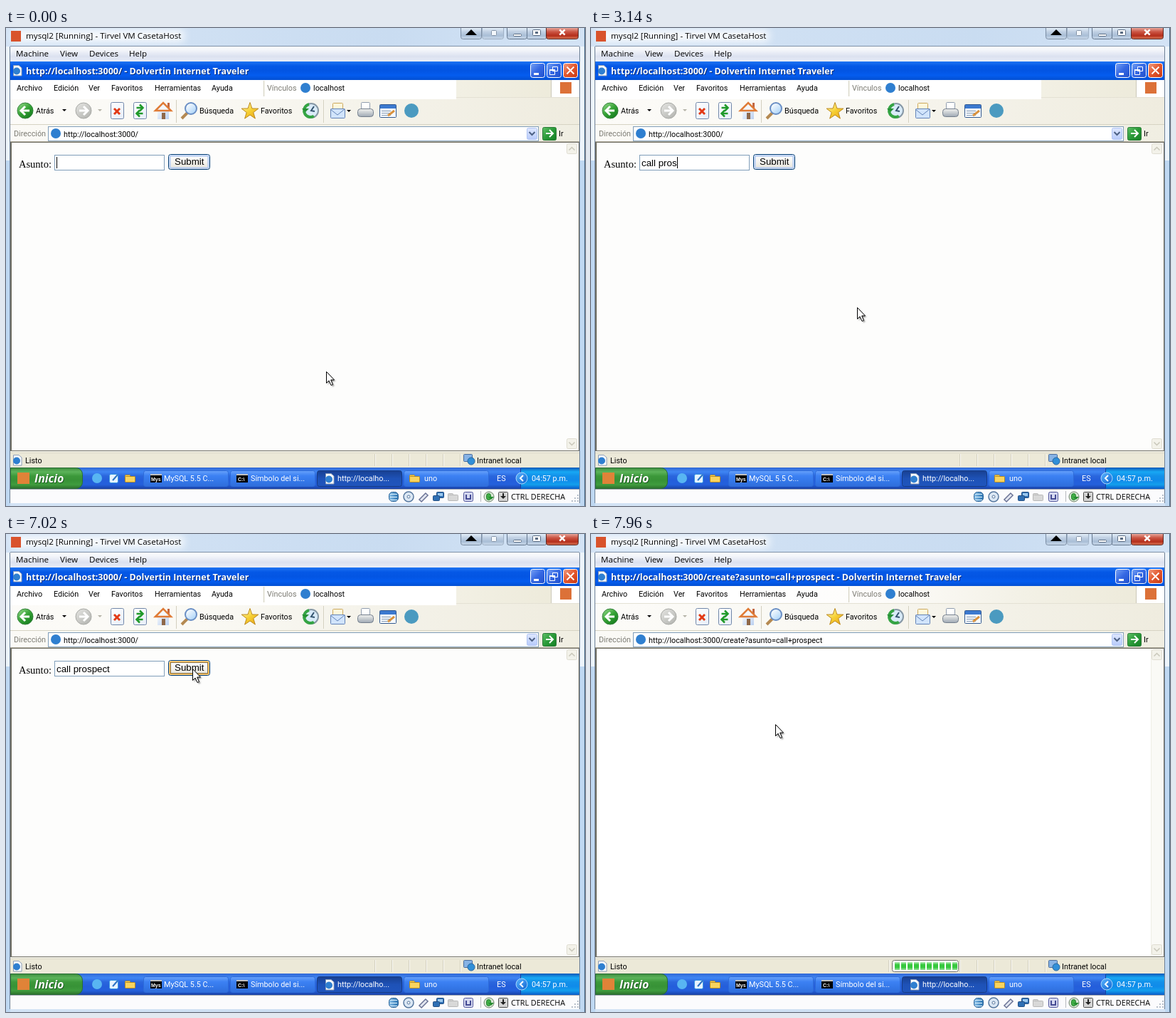
These frames come from a looping animation (814 by 671 pixels, 8 s). An HTML page with a canvas:

```html
<!DOCTYPE html>
<html lang="es">
<head>
<meta charset="utf-8">
<title>Formulario</title>
<style>
html, body { margin: 0; width: 814px; height: 671px; overflow: hidden; background: #fff; }
canvas { display: block; }
</style>
</head>
<body>
<canvas id="stage" width="814" height="671"></canvas>
<script>
const ctx = document.getElementById('stage').getContext('2d');
const UI = '10.8px Roboto, sans-serif';
const HOST = '11.6px "Open Sans", sans-serif';
const CAPTION = 'bold 12.5px "Open Sans", sans-serif';
const FORM = '13.33px "Liberation Sans", sans-serif';
const SERIF = '14.5px "Liberation Serif", serif';
const CREAM = '#ece9d8';
const GLOBE = '#2f7fd0';
const URL_HOME = 'http://localhost:3000/';
const URL_DONE = URL_HOME + 'create?asunto=call+prospect';

const LOOP = 8000;
const TICK = 134.7;
const TYPE_START = 1670, TYPE_END = 4620, KEY_TIME = 183;
const TAB = 5040, HOVER = 6890, LOAD = 7290, DONE = 7680;

const clamp = (v, lo, hi) => Math.min(hi, Math.max(lo, v));
const smooth = (t, start, end) => {
  const u = clamp((t - start) / (end - start), 0, 1);
  return u * u * (3 - 2 * u);
};
const mix = (a, b, u) => a + (b - a) * u;

// The pointer is sampled once per tick: glide in, swing round to the button, drop away
function pointerAt(t) {
  const time = Math.floor(t / TICK) * TICK;
  const glide = smooth(time, 0, 220), swing = smooth(time, 6200, 7000), drop = smooth(time, 7200, 7945);
  const follow = (from, rest, pull, button, end) => {
    const start = mix(from, rest, glide);
    const curve = mix(mix(start, pull, swing), mix(pull, button, swing), swing);
    return mix(curve, end, drop);
  };
  return [follow(450, 374, 60, 262, 259), follow(482, 392, 235, 189, 267)].map(Math.round);
}
const typedAt = t => clamp(1 + Math.floor((t - TYPE_START) / KEY_TIME), 0, 13);
const caretAt = t => t < TYPE_START ? Math.floor((t + 435) / 565) % 2 === 0 : t < TYPE_END;
const blocksAt = t => clamp(1 + Math.floor((t - 7400) / 30), 0, 10);
const networkAt = t => Math.floor(t / TICK) % 7 === 0 && (t > 6300 || t > TYPE_START && t < TYPE_END);

function ramp(x0, y0, x1, y1, ...colors) {
  const g = ctx.createLinearGradient(x0, y0, x1, y1);
  colors.forEach((c, i) => g.addColorStop(i / (colors.length - 1), c));
  return g;
}
const down = (y, h, ...colors) => ramp(0, y, 0, y + h, ...colors);
const across = (...colors) => ramp(6, 0, 806, 0, ...colors);

function paint(fill, stroke, width = 1) {
  if (fill) { ctx.fillStyle = fill; ctx.fill(); }
  if (stroke) { ctx.strokeStyle = stroke; ctx.lineWidth = width; ctx.stroke(); }
}
function rect(x, y, w, h, fill) {
  ctx.fillStyle = fill;
  ctx.fillRect(x, y, w, h);
}
function round(x, y, w, h, r, fill, stroke, width) {
  ctx.beginPath();
  ctx.roundRect(x + .5, y + .5, w - 1, h - 1, r);
  paint(fill, stroke, width);
}
function disc(x, y, r, fill, stroke, width) {
  ctx.beginPath();
  ctx.arc(x, y, r, 0, Math.PI * 2);
  paint(fill, stroke, width);
}
function shape(x, y, points, fill, stroke, width, open) {
  ctx.beginPath();
  for (let i = 0; i < points.length; i += 2) ctx.lineTo(x + points[i], y + points[i + 1]);
  if (!open) ctx.closePath();
  paint(fill, stroke, width);
}
const line = (x, y, points, color, width) => shape(x, y, points, null, color, width, true);
function text(str, x, y, font = UI, color = '#000') {
  ctx.font = font;
  ctx.fillStyle = color;
  ctx.fillText(str, x, y);
}
function cross(x, y, r, color, width) {
  line(x, y, [-r, -r, r, r], color, width);
  line(x, y, [r, -r, -r, r], color, width);
}
function sideArrow(x, y, dir, r, color, width) {
  line(x, y, [-r * dir, 0, r * dir, 0], color, width);
  line(x, y, [0, -r, r * dir, 0, 0, r], color, width);
}
const chevronV = (x, y, r, dir, color, width) => line(x, y, [-r, -dir * r / 2, 0, dir * r / 2, r, -dir * r / 2], color, width);
const dropMark = (x, y, color, r = 3) => shape(x, y, [-r, 0, r, 0, 0, r], color);
function groove(x, y, h) {
  rect(x, y, 1, h, '#d3d0c0');
  rect(x + 1, y, 1, h, '#f9f8f2');
}
function pageIcon(x, y) {
  shape(x, y, [2.5, .5, 10, .5, 14, 4, 14, 15, 2.5, 15], '#fff', '#8a9bb5');
  disc(x + 7, y + 8.5, 5, GLOBE);
}
function folder(x, y, color = '#f9d45f', edge = '#b58a20') {
  round(x, y + 2, 8, 5, 1, color, edge);
  round(x, y + 4, 15, 9, 1, color, edge);
}

function hostWindow() {
  rect(0, 0, 814, 671, across('#d3e3f5', '#cfe0f3', '#c9dcf1', '#d3e3f5'));
  ctx.save();
  ctx.filter = 'blur(6px)';
  rect(10, 3, 240, 16, 'rgba(255,255,255,.9)');
  ctx.restore();
  for (const x of [0, 807]) {
    rect(x, 26, 6, 160, '#edf4fb');
    rect(x, 186, 6, 485, '#bfd8f2');
  }
  rect(5, 26, 1, 641, '#6f8196');
  rect(806, 26, 1, 641, '#6f8196');
  rect(813, 0, 1, 671, '#4b6d8c');

  rect(7, 4, 14, 15, '#d9532c');
  text('mysql2 [Running] - Tirvel VM CasetaHost', 28, 15, HOST);

  const glass = down(0, 16, '#e2edf8', '#c0d0e3', '#a9bed6', '#d0deee');
  round(639, -5, 30, 21, 3, glass, '#7b8da3');
  round(669, -5, 31, 21, 3, glass, '#9fb0c4');
  shape(654, 2, [0, 0, 8, 8, -8, 8], '#000');
  round(682, 3, 8, 8, 1, '#f4f8fc', '#8494a8');
  round(704, -5, 29, 21, 3, glass, '#65788f');
  round(732, -5, 28, 21, 2, glass, '#65788f');
  round(759, -5, 46, 21, 3, down(0, 16, '#e6a397', '#cb5544', '#b52e1b', '#dc7e5b'), '#5d2a25');
  round(713, 8, 12, 4, 1, '#fff', '#596b82');
  round(740, 2, 12, 9, 1, '#fff', '#596b82');
  rect(744, 5, 4, 3, '#596b82');
  cross(782, 6, 3.7, '#fff', 2.5);

  rect(6, 25, 800, 1, '#7d8fa6');
  rect(6, 26, 800, 21, down(26, 21, '#ffffff', '#eef1f8', '#dbe1f0', '#e9edf7'));
  text('Machine', 14, 40, HOST);
  text('View', 76, 40, HOST);
  text('Devices', 117, 40, HOST);
  text('Help', 173, 40, HOST);
}

function captionButton(x, ...colors) {
  round(x, 49, 21, 21, 3, ramp(x, 49, x + 20, 70, ...colors), '#fff');
}

function caption(url) {
  rect(6, 47, 800, 26, down(47, 26, '#1f74f2', '#0558e6', '#0355e3', '#045cef', '#0450d2'));
  pageIcon(8, 52);
  const title = url + ' - Dolvertin Internet Traveler';
  text(title, 29, 66, CAPTION, '#06307f');
  text(title, 28, 65, CAPTION, '#fff');
  const blue = ['#7ba5f5', '#3568e3', '#2050cc'];
  captionButton(737, ...blue);
  captionButton(760, ...blue);
  captionButton(783, '#f0a58c', '#e3572d', '#c53612');
  rect(742, 63, 7, 3, '#fff');
  round(768, 54, 8, 7, 0, null, '#fff');
  round(764, 58, 8, 8, 0, null, '#fff');
  rect(764, 58, 8, 2, '#fff');
  cross(793.5, 59.5, 5, '#fff', 2);
}

function toolbarIcons() {
  disc(27, 116, 11, ramp(18, 106, 34, 126, '#8fd685', '#36a336', '#167d1f'), '#34813a');
  sideArrow(27, 116, -1, 6, '#fff', 3);
  disc(109, 116, 11, ramp(100, 106, 116, 126, '#e2e2df', '#b6b7b3'), '#a8a9a5');
  sideArrow(109, 116, 1, 6, '#fff', 3);
  dropMark(82, 114, '#000');
  dropMark(132, 114, '#b5b3a8');

  for (const x of [147, 179]) round(x, 104, 19, 24, 2, ramp(x, 104, x + 18, 127, '#fff', '#e7eef9'), '#7187a9');
  cross(156, 117, 4, '#e23a16', 3);
  sideArrow(188, 112, 1, 4.5, '#209a2a', 2.5);
  sideArrow(188, 120, -1, 4.5, '#209a2a', 2.5);

  rect(213, 115, 16, 13, ramp(212, 110, 230, 128, '#fff', '#b9cff0'));
  rect(227, 105, 3, 8, '#c26842');
  shape(210, 116, [0, 0, 11, -11, 22, 0], '#f4f7fc', '#e07c37', 2.5);
  rect(219, 119, 5, 9, '#8e684a');
  groove(239, 101, 32);

  line(255, 119, [0, 0, -8, 8], '#b58a52', 4);
  disc(260, 113, 8, ramp(254, 106, 266, 120, '#ffffff', '#a9d3f8'), '#6a8fc5', 2);
  const star = [];
  for (let i = 0; i < 10; i++) {
    const r = i % 2 ? 5 : 12.5, a = i * Math.PI / 5 - Math.PI / 2;
    star.push(r * Math.cos(a), r * Math.sin(a));
  }
  shape(343, 117, star, ramp(335, 106, 350, 128, '#fff8a0', '#f6cf32', '#e9a51a'), '#bd8a1d');
  disc(429, 116, 10, '#d9ebf8', '#8798a6', 2);
  line(429, 116, [4, -6, 0, 0, 5, 1], '#33536e', 2);
  ctx.beginPath();
  ctx.arc(428, 116, 9, 1, 4.5);
  paint(null, '#35a444', 4);
  dropMark(421, 113, '#279135', 5);
  groove(446, 101, 32);

  round(459, 105, 15, 14, 1, '#fff8dc', '#cba85e');
  round(456, 113, 21, 14, 1, '#d1e4fb', '#6283b7');
  line(456, 114, [0, 0, 10, 8, 20, 0], '#6283b7');
  dropMark(482, 115, '#000');
  round(499, 104, 13, 12, 1, '#fff', '#909dae');
  round(494, 113, 23, 12, 4, down(113, 12, '#f5f5f1', '#9ba5b1'), '#747f8c');
  round(525, 107, 24, 19, 1, '#f7fbff', '#31588f');
  rect(526, 108, 22, 5, '#3c79cf');
  for (let y = 116; y < 124; y += 3) rect(528, y, 13, 1, '#8196b0');
  line(537, 123, [0, 0, 9, -7], '#d9923e', 3);
  disc(570, 116, 10, '#4b9ac0');
}

function browserBars(url, repainted) {
  rect(6, 73, 800, 87, CREAM);
  rect(6, 73, 800, 25, across('#fff', '#fff', '#fdfcfa', '#f3f1e6', CREAM));
  rect(6, 98, 800, 38, across('#fcfbf8', '#faf9f4', '#f4f2e9', '#efecdf'));
  rect(6, 136, 800, 24, across('#fbfaf6', '#f0eee2'));
  rect(6, 97, 800, 1, '#e4e1d4');
  rect(6, 135, 800, 1, '#d6d3c3');
  if (!repainted) rect(6, 73, 627, 27, '#fff');
  text('Archivo', 15, 88);
  text('Edición', 67, 88);
  text('Ver', 116, 88);
  text('Favoritos', 148, 88);
  text('Herramientas', 209, 88);
  text('Ayuda', 289, 88);
  groove(362, 74, 22);
  text('Vínculos', 367, 88, UI, '#7c7b73');
  disc(421, 84, 7, GLOBE);
  text('localhost', 432, 88);
  rect(766, 73, 1, 24, '#cbc8b8');
  rect(767, 73, 39, 24, '#fff');
  rect(779, 76, 16, 16, '#dc7138');

  toolbarIcons();
  text('Atrás', 42, 120);
  text('Búsqueda', 272, 120);
  text('Favoritos', 358, 120);

  text('Dirección', 11, 152, UI, '#7c7b73');
  rect(59, 138, 690, 21, '#7f9db9');
  rect(60, 139, 688, 19, '#fff');
  disc(70, 148, 7, GLOBE);
  text(url, 81, 153);
  round(732, 140, 15, 17, 2, down(140, 17, '#dfe8fe', '#b7cafa'), '#b0c4f3');
  chevronV(739.5, 148, 4, 1, '#4d6185', 2);
  round(754, 139, 20, 19, 2, ramp(754, 139, 774, 158, '#63c36a', '#2a9a38', '#147e24'), '#2a7a36');
  sideArrow(764, 148, 1, 5, '#fff', 2);
  text('Ir', 777, 152);
}

function scrollButton(y, dir) {
  round(788, y, 15, 15, 2, '#f3f2ea', '#dfddd1');
  chevronV(795.5, y + 7.5, 4, dir, '#c9c7ba', 1.5);
}

function submitButton(focused, hover) {
  round(228, 177, 59, 22, 3, down(177, 22, '#fff', '#f5f4ef', '#e3e0d6'), '#003c74');
  round(230, 179, 55, 18, 1, null, hover ? '#f5b440' : '#b4cbf3', 2);
  if (focused) {
    ctx.setLineDash([1, 1]);
    round(231, 180, 53, 16, 0, null, '#222');
    ctx.setLineDash([]);
  }
  text('Submit', 237, 192, FORM);
}

function page(t) {
  rect(6, 159, 800, 1, '#aca899');
  rect(6, 160, 800, 434, '#716f64');
  rect(8, 161, 797, 432, t < LOAD ? '#fdfdfc' : '#fff');
  if (t >= LOAD) {
    rect(787, 161, 17, 432, '#efeee6');
    rect(788, 161, 16, 432, '#fafaf6');
  }
  scrollButton(162, -1);
  scrollButton(576, 1);
  if (t >= DONE) return;

  text('Asunto:', 18, 196, SERIF);
  rect(68, 178, 155, 22, '#7f9db9');
  rect(69, 179, 153, 20, '#fff');
  const value = 'call prospect'.slice(0, typedAt(t));
  text(value, 71, 194, FORM);
  if (caretAt(t)) rect(Math.round(71 + ctx.measureText(value).width), 181, 1, 16, '#000');
  submitButton(t >= TAB, t >= HOVER);
}

function statusBar(t) {
  rect(6, 594, 800, 24, CREAM);
  rect(6, 594, 800, 1, '#f8f7f1');
  rect(6, 596, 800, 1, '#dcd9ca');
  pageIcon(8, 599);
  text(t >= LOAD && t < DONE ? 'Abriendo página ' + URL_DONE + '...' : 'Listo', 27, 611);
  for (let x = 518; x <= 638; x += 24) groove(x, 598, 17);
  if (t >= LOAD) {
    groove(418, 598, 17);
    round(423, 598, 94, 17, 3, '#fff', '#6f6e68');
    for (let i = 0; i < blocksAt(t); i++)
      rect(427 + i * 9, 601, 7, 11, down(601, 11, '#b5edb8', '#36c83d', '#36c83d', '#9ae49f'));
  }
  round(643, 598, 13, 11, 1, '#87b3e5', '#476b9d');
  disc(654, 608, 5, '#318fd8', '#28679f');
  text('Intranet local', 662, 611);
}

function taskButton(index, label, active) {
  const x = 193 + index * 122;
  const colors = active ? ['#183f8f', '#1e52b7', '#2055bd'] : ['#6ba4fb', '#3c81f3', '#3477e8', '#2f6dda'];
  round(x, 621, 120, 23, 3, down(621, 23, ...colors), active ? '#173b83' : '#2e6bd8');
  text(label, x + 29, 636, UI, '#fff');
}

function taskbar() {
  rect(6, 617, 800, 30, down(617, 30, '#3168d5', '#3f86f4', '#2a66dd', '#245edb', '#2460dc', '#1941a5'));
  round(6, 617, 102, 30, [0, 9, 9, 0], down(617, 30, '#3c8a3c', '#5cb35a', '#3c983a', '#379236', '#3f9c3e', '#2b6c2b'), '#286b35');
  rect(16, 624, 17, 16, '#e08338');
  const start = 'italic bold 16px "Open Sans", sans-serif';
  text('Inicio', 41, 639, start, '#235c27');
  text('Inicio', 40, 638, start, '#fff');

  disc(128, 632, 7, '#58b5f2');
  round(145, 626, 13, 13, 2, '#e6f4ff', '#3b9be0');
  line(150, 635, [0, 0, 7, -8], '#2d74c4', 2);
  folder(167, 625);

  taskButton(0, 'MySQL 5.5 C...');
  taskButton(1, 'Símbolo del si...');
  taskButton(2, 'http://localho...', true);
  taskButton(3, 'uno');
  for (const x of [203, 324]) {
    rect(x, 626, 16, 12, '#c0c0c0');
    rect(x, 628, 16, 10, '#000');
  }
  const tiny = 'bold 7px "Liberation Sans", sans-serif';
  text('Mys', 204, 636, tiny, '#fff');
  text('C:\\', 326, 636, tiny, '#fff');
  pageIcon(447, 625);
  folder(567, 625);

  text('ES', 690, 636, UI, '#fff');
  rect(723, 618, 1, 28, '#173f9e');
  rect(724, 617, 82, 30, down(617, 30, '#0c59b9', '#18a8f4', '#1290e9', '#0f8bea', '#139fed', '#095bc9'));
  disc(725, 632, 8, ramp(718, 624, 732, 640, '#58b4ff', '#1065d2'), '#a9d7fb');
  line(725, 632, [2, -4, -2, 0, 2, 4], '#fff', 2);
  text('04:57 p.m.', 739, 636, UI, '#fff');
}

function hostStatus(busy) {
  rect(6, 647, 800, 20, '#fbfbfd');
  rect(6, 647, 800, 1, '#a4a8b0');
  round(538, 651, 14, 14, 5, ramp(538, 0, 552, 0, '#91c6ed', '#2770ae'), '#275f94');
  for (let y = 654; y < 663; y += 4) rect(540, y, 10, 1, '#d8effc');
  disc(566, 658, 7, '#dbe7f4', '#57789f', 1.5);
  disc(566, 658, 2, '#fff', '#57789f');
  line(582, 664, [0, 0, 10, -10], '#6b7396', 6);
  line(583, 663, [0, 0, 8, -8], '#e2e6f0', 3);
  const screen = busy ? '#71c2ff' : '#2f6fb4';
  round(605, 651, 11, 9, 1, screen, '#244f83');
  rect(607, 653, 7, 4, '#9bc8ef');
  round(600, 656, 10, 8, 1, screen, '#244f83');
  folder(621, 651, '#d8d8d8', '#b8b8b8');
  round(643, 651, 14, 14, 2, '#d5d8f0', '#50559b');
  line(647, 655, [0, 0, 0, 6, 6, 6, 6, 0], '#454b94', 2);
  rect(667, 650, 1, 15, '#b7b9be');
  disc(679, 658, 7, '#d8e8d5', '#70836c');
  round(675, 653, 7, 10, 3, '#40ae45', '#247f2d');
  dropMark(682, 658, '#268c31', 4);
  round(692, 651, 14, 14, 1, '#d5d5d5', '#4c4c4c');
  rect(698, 653, 2, 5, '#222');
  dropMark(699, 657, '#222', 4);
  text('CTRL DERECHA', 710, 662, '10.8px "Open Sans", sans-serif');
  for (let i = 0; i < 3; i++)
    for (let j = 0; j <= i; j++) rect(803 - j * 4, 655 + i * 4, 2, 2, '#b7bfca');
}

function arrow([x, y]) {
  const outline = [.5, .5, .5, 16.5, 4, 13, 7, 19.5, 9.5, 18.5, 6.7, 12, 11.5, 12];
  ctx.save();
  ctx.shadowColor = 'rgba(0,0,0,.4)';
  ctx.shadowOffsetX = ctx.shadowOffsetY = 2;
  ctx.shadowBlur = 2;
  shape(x, y, outline, '#fff');
  ctx.restore();
  shape(x, y, outline, '#fff', '#000');
}

function draw(t) {
  const url = t < DONE ? URL_HOME : URL_DONE;
  hostWindow();
  caption(url);
  browserBars(url, t >= LOAD);
  page(t);
  statusBar(t);
  taskbar();
  hostStatus(networkAt(t));
  arrow(pointerAt(t));
}

const begin = performance.now();
function tick() {
  draw((performance.now() - begin) % LOOP);
  requestAnimationFrame(tick);
}
tick();
</script>
</body>
</html>
```
